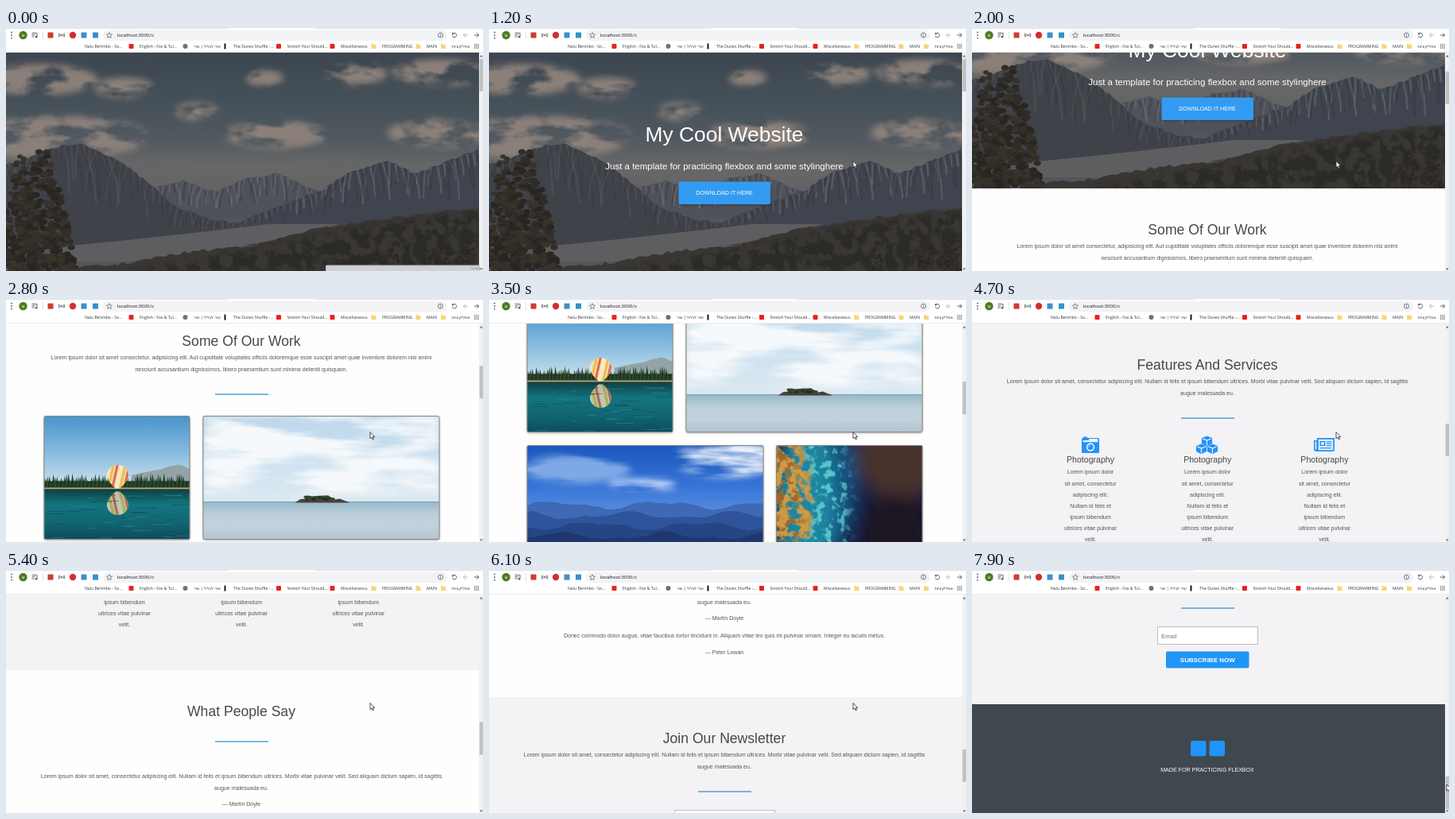
Animation, 600 px wide and 306 px high, one loop 8 s. Source, as an HTML page:

```html
<!DOCTYPE html>
<html lang="en">
<head>
<meta charset="utf-8">
<title>My Cool Website</title>
<style>
html, body { margin: 0; width: 100%; height: 100%; overflow: hidden; background: #fff; }
svg { display: block; }
text { font-family: "Liberation Sans", Arial, sans-serif; }
.ui { font-family: "Open Sans", "Noto Sans", "DejaVu Sans", sans-serif; }
.url { font-family: Roboto, sans-serif; }
</style>
</head>
<body>
<script>
let seed = 7;
const rand = () => (seed = (seed * 16807) % 2147483647) / 2147483647;
const jitter = a => (rand() - 0.5) * 2 * a;
const times = (n, f) => Array.from({ length: n }, (_, i) => f(i)).join('');

const rect = (x, y, w, h, fill, extra = '') =>
  `<rect x="${x}" y="${y}" width="${w}" height="${h}" fill="${fill}" ${extra}/>`;
const oval = (x, y, rx, ry, fill, extra = '') =>
  `<ellipse cx="${x}" cy="${y}" rx="${rx}" ry="${ry}" fill="${fill}" ${extra}/>`;
const disc = (x, y, r, fill) => oval(x, y, r, r, fill);
const path = (d, fill, extra = '') => `<path d="${d}" fill="${fill}" ${extra}/>`;
const line = (d, color, w = 1, extra = '') =>
  `<path d="${d}" fill="none" stroke="${color}" stroke-width="${w}" ${extra}/>`;
const using = (filter, content) => `<g filter="url(#${filter})">${content}</g>`;
// y is the optical middle of the line
const label = (x, y, s, size = 7.06, fill = '#555', extra = 'text-anchor="middle"') =>
  `<text x="${x}" y="${y + size * 0.35}" font-size="${size}" fill="${fill}" ${extra}>${s}</text>`;

// Evenly spaced vertical gradient
const gradient = (id, ...colors) =>
  `<linearGradient id="${id}" x2="0" y2="1">${colors.map((c, i) =>
    `<stop offset="${i / (colors.length - 1)}" stop-color="${c}"/>`).join('')}</linearGradient>`;
const REGION = 'x="-30%" y="-60%" width="160%" height="220%"';
const blur = (id, s) => `<filter id="${id}" ${REGION}><feGaussianBlur stdDeviation="${s}"/></filter>`;
// Softens a shape, then breaks it up with noise
const grain = (id, freq, soft, gain, shift) => `<filter id="${id}" ${REGION}>
  <feTurbulence type="fractalNoise" baseFrequency="${freq}" numOctaves="4" seed="3"/>
  <feColorMatrix values="0 0 0 0 1  0 0 0 0 1  0 0 0 0 1  ${gain} 0 0 0 ${-shift}" result="noise"/>
  <feGaussianBlur in="SourceGraphic" stdDeviation="${soft}"/>
  <feComposite operator="in" in2="noise"/></filter>`;

// Roughened ridge line through a few key points
function rough(points, amp, step = 6) {
  const out = [];
  points.slice(1).forEach(([x1, y1], i) => {
    const [x0, y0] = points[i];
    for (let x = x0; x < x1; x += step)
      out.push([x, y0 + (y1 - y0) * (x - x0) / (x1 - x0) + jitter(amp)]);
  });
  return [...out, points.at(-1)];
}
const area = (pts, base, fill) =>
  path(`M${pts[0][0]} ${base}L${pts.map(p => p.map(v => v.toFixed(1))).join('L')}L${pts.at(-1)[0]} ${base}Z`, fill);
const ridge = (points, base, fill, amp = 1.5) => area(rough(points, amp), base, fill);

// Ridge with light and dark gullies running down from its crest
function mountain(points, base, fill, light) {
  const crest = rough(points, 1.5, 4);
  return area(crest, base, fill) + crest.map(([x, y], i) => {
    const drop = (base - y) * (0.15 + rand() * 0.45);
    const lean = jitter(drop / 3);
    return line(`M${x} ${y + 1}l${lean * 0.6} ${drop * 0.5}l${lean * 0.2} ${drop * 0.5}`,
      i % 2 ? light : '#33363d', 1 + rand() * 2, 'opacity=".4"');
  }).join('');
}

// Conifer made of random tufts widening downwards
const pine = (x, top, h, w) => times(Math.round(h * 1.8), () => {
  const p = Math.sqrt(rand()), reach = w * Math.pow(p, 0.7);
  return oval(x + jitter(reach), top + h * p, 1 + w * 0.09, 1 + w * 0.06,
    ['#292622', '#302d27', '#37322a'][Math.floor(rand() * 3)]);
});

function hero() {
  const puffs = [[40, 65, 75], [148, 75, 38], [240, 105, 28], [325, 63, 24], [440, 58, 40],
    [545, 56, 60], [340, 134, 65], [550, 132, 70], [60, 138, 120]];
  return rect(0, 31, 595, 277, 'url(#dusk)') +
    using('puff', puffs.map(([x, y, r]) => oval(x, y, r, 6 + r * 0.18, '#8b8079')).join('')) +
    using('haze', oval(300, 178, 320, 18, '#77706d', 'opacity=".45"')) +
    mountain([[170, 205], [222, 192], [262, 206], [300, 190], [342, 183], [385, 203], [420, 212]], 245, '#4f525a', '#7a7a7d') +
    rect(0, 240, 595, 68, '#53555b') +
    mountain([[290, 245], [350, 221], [400, 203], [430, 182], [482, 167], [515, 184], [560, 166], [595, 152]], 256, '#3f444e', '#7c7c80') +
    mountain([[0, 172], [70, 148], [97, 147], [140, 165], [180, 196], [212, 224], [255, 240], [315, 250]], 274, '#40424a', '#5d5a59') +
    path('M60 276Q190 264 330 247L420 247L330 268L200 294H60Z', '#5e5e61') +
    ridge([[60, 304], [140, 298], [230, 282], [320, 272], [380, 255], [470, 241], [595, 226]], 308, '#393633', 2) +
    using('leaf', path('M150 308L320 276L470 246L595 230V308Z', '#2c2a28')) +
    pine(18, 153, 155, 28) + pine(47, 146, 162, 42) +
    pine(490, 284, 24, 9) + pine(550, 258, 50, 11) + pine(581, 268, 40, 14);
}

const heroText = () =>
  label(296, 134, 'My Cool Website', 26.4, '#fff') +
  label(296, 174, 'Just a template for practicing flexbox and some stylinghere', 11.53, '#fff') +
  using('glow', rect(238.5, 195, 115.5, 28.5, '#000', 'rx="2" opacity=".25"')) +
  rect(238.5, 193.5, 115.5, 28.5, '#339cf2', 'rx="2"') +
  label(296, 207.5, 'DOWNLOAD IT HERE', 7.1, '#fff');

function section(top, title, lines, ruleAt = 119) {
  return label(296, top + 52, title, 17.6, '#484848') +
    lines.map((s, i) => label(296, top + 73 + 14.2 * i, s)).join('') +
    rect(263, top + ruleAt - 0.6, 67, 1.3, '#3b93cb');
}

const card = (x, y, w, art) =>
  using('glow', rect(x, y + 1, w, 155, '#000', 'rx="2" opacity=".45"')) +
  `<svg x="${x}" y="${y}" width="${w}" height="155">${art}</svg>` +
  rect(x, y, w, 155, 'none', 'rx="2" stroke="#85887f"');

function balloon() {
  const shape = 'M79 75A13.5 13.5 0 1 1 106 75Q104 84 95 91H90Q81 84 79 75Z';
  const stripes = times(9, i =>
    line(`M${70 + i * 5} 94l8-36`, ['#e2684a', '#f6ead2', '#efbb4d'][i % 3], 3));
  const craft = path(shape, '#f3dfb0') + `<g clip-path="url(#envelope)">${stripes}</g>`;
  const trees = times(80, i => {
    const x = i * 2.4 - 3, h = 10 + rand() * 11;
    return path(`M${x} 92l2.6 ${-h}l2.6 ${h}Z`, i % 2 ? '#1c3526' : '#2d4a2c');
  });
  return `<clipPath id="envelope"><path d="${shape}"/></clipPath>` +
    rect(0, 0, 183, 92, 'url(#day)') +
    ridge([[110, 74], [145, 68], [168, 60], [183, 66]], 92, '#94a3a6', 1) +
    rect(0, 82, 183, 9, '#162c20') + trees +
    rect(0, 90, 183, 65, 'url(#lake)') + rect(0, 90, 183, 1.8, '#c3a76c') + craft +
    `<g transform="translate(0 186) scale(1 -1)" opacity=".75">${craft}</g>` +
    times(45, () => rect(rand() * 180 - 10, 96 + rand() * 58, 6 + rand() * 20, 0.8,
      rand() < 0.5 ? '#2a939c' : '#0c4350', 'opacity=".6"'));
}

const island = () =>
  rect(0, 0, 297, 109, 'url(#pale)') +
  using('wisp', rect(0, 0, 297, 98, '#f6f9fb')) +
  rect(0, 108, 297, 47, 'url(#sea)') + rect(0, 107.5, 297, 1, '#7f9fb0') +
  ridge([[116, 108], [123, 105], [134, 101], [157, 101], [166, 104], [183, 108]], 109, '#4a4038') +
  times(14, () => oval(144 + jitter(20), 103 + jitter(2), 3, 1.8, rand() < 0.5 ? '#39452f' : '#26301f'));

const blueHills = () =>
  rect(0, 0, 297, 155, 'url(#azure)') +
  using('wisp', oval(255, 18, 70, 22, '#f2f7fd') + oval(145, 50, 42, 7, '#dce9fa') + oval(60, 30, 70, 18, '#7fa9e6')) +
  ['#3f69b4', '#30549c', '#264585', '#1e376e', '#182b58'].map((fill, k) => {
    const crest = Array.from({ length: 34 }, (_, i) =>
      [i * 9, 75 + k * 13 - 4 * Math.sin(i * 0.42 + k * 2) - 2 * Math.sin(i * 0.9 + k) + jitter(0.8)]);
    return area(crest, 155, fill);
  }).join('');

const coast = () =>
  rect(0, 0, 184, 155, '#17183a') +
  using('haze', oval(155, 10, 55, 60, '#46302f') + oval(150, 120, 40, 60, '#1d1724') +
    oval(70, 50, 32, 80, '#18507e') + oval(36, 70, 38, 100, '#1b86a2')) +
  using('foam', oval(50, 70, 42, 100, '#58c3cb')) +
  using('leaf', oval(14, 78, 32, 95, '#d09a45')) +
  using('foam', oval(8, 78, 28, 95, '#9c662a'));

const BLUE = '#2094fa', PALE = '#f3f2f5';
const camera = rect(138, 976, 22, 19, BLUE, 'rx="1.5"') + rect(140, 974.5, 5, 2, BLUE) +
  rect(139.5, 979, 19, 2.2, PALE) + rect(147, 977, 11, 2, PALE) +
  disc(149, 987.5, 5.2, PALE) + disc(149, 987.5, 3.6, BLUE) +
  line('M146.8 987.5a2.2 2.2 0 0 1 2.2-2.2', PALE, 0.8);
const cube = (x, y) => path(`M${x} ${y}l6.6 2.6v7l-6.6 3.2l-6.6-3.2v-7Z`, BLUE) +
  line(`M${x - 5.4} ${y + 3.2}l5.4 2.3l5.4-2.3M${x} ${y + 5.5}v6.2`, PALE, 1.2);
const cubes = cube(295.5, 973.5) + cube(288.5, 983.5) + cube(302.5, 983.5);
const paper = path('M434 976h22v15q0 2-2 2h-21q-3 0-3-3v-11h4Z', BLUE) +
  rect(435.8, 977.8, 18.4, 13.4, PALE) + rect(431.6, 980.5, 1.7, 10, PALE) +
  rect(437.5, 980, 7, 6, BLUE) + rect(439, 981.5, 4, 3, PALE) +
  times(3, i => rect(446, 980 + i * 2.5, 6.5, 1.3, BLUE)) + rect(437.5, 988, 15, 1.3, BLUE);

const LOREM = ['Lorem ipsum dolor sit amet, consectetur adipiscing elit. Nullam id felis et ipsum bibendum ultrices. Morbi vitae pulvinar velit. Sed aliquam dictum sapien, id sagittis',
  'augue malesuada eu.'];
const BLURB = ['Lorem ipsum dolor', 'sit amet, consectetur', 'adipiscing elit.', 'Nullam id felis et',
  'ipsum bibendum', 'ultrices vitae pulvinar', 'velit.'];
const QUOTES = ['— Martin Doyle',
  'Donec commodo dolor augue, vitae faucibus tortor tincidunt in. Aliquam vitae leo quis mi pulvinar ornare. Integer eu iaculis metus.',
  '— Peter Lowan'];

const page = () =>
  hero() + `<g id="intro">${heroText()}</g>` +
  rect(0, 308, 595, 524, '#fefefe') +
  section(308, 'Some Of Our Work', [
    'Lorem ipsum dolor sit amet consectetur, adipisicing elit. Aut cupiditate voluptates officiis doloremque esse suscipit amet quae inventore dolorem nisi animi',
    'nesciunt accusantium dignissimos, libero praesentium sunt minima deleniti quisquam.']) +
  card(48, 454.5, 183, balloon()) + card(248, 454.5, 297, island()) +
  card(48, 626.5, 297, blueHills()) + card(361.5, 626.5, 183.5, coast()) +
  rect(0, 832, 595, 329, PALE) +
  section(832, 'Features And Services', LOREM) + camera + cubes + paper +
  times(3, i => label(149 + 147.2 * i, 1003, 'Photography', 10.6, '#484848') +
    BLURB.map((s, k) => label(149 + 147.2 * i, 1019 + 14.17 * k, s)).join('')) +
  rect(0, 1161, 595, 268, '#fefefe') +
  section(1161, 'What People Say', [], 90) +
  LOREM.map((s, i) => label(296, 1295 + 14.2 * i, s)).join('') +
  QUOTES.map((s, i) => label(296, 1330 + 21.2 * i, s)).join('') +
  rect(0, 1429, 595, 240, PALE) +
  section(1429, 'Join Our Newsletter', LOREM) +
  rect(233.5, 1571.5, 126, 22, '#fff', 'stroke="#bdbdbd"') +
  label(238, 1583, 'Email', 7.9, '#777', '') +
  rect(244, 1602.5, 104.5, 21, '#2095f5', 'rx="2"') +
  label(296.3, 1613, 'SUBSCRIBE NOW', 8, '#fff', 'text-anchor="middle" font-weight="bold"') +
  rect(0, 1669, 595, 140, '#40484f') +
  rect(275, 1715, 19.5, 19.5, BLUE, 'rx="3"') + rect(298.5, 1715, 19.5, 19.5, BLUE, 'rx="3"') +
  label(296, 1752, 'MADE FOR PRACTICING FLEXBOX', 7.08, '#fff');

const GREY = '#5a5e63';
const ICONS = {
  video: x => rect(x - 3, 20, 6, 6, '#e8231f', 'rx="1"'),
  folder: x => path(`M${x - 3} 20h2.5l1 1h2.5v5h-6Z`, '#f6d678'),
  round: x => disc(x, 23, 3, '#77706c'),
  bar: x => rect(x - 1, 19.5, 2, 7, '#161616'),
  grid: x => times(9, i => rect(x - 3 + (i % 3) * 2.2, 20 + Math.floor(i / 3) * 2.2, 1.5, 1.5,
    ['#d9685d', '#7fa968', '#6f8fc4'][i % 3]))
};
// Left edge, title and the icon that follows it
const BOOKMARKS = [[99, 'Nalu Berimbo - So...', 'video'], [168, 'English - Fox &amp; Tul...', 'round'],
  [236, 'שיר לגליל | שיר', 'bar'], [286, 'The Dunes Shuffle -...', 'video'],
  [353.5, 'Stretch Your Should...', 'video'], [421, 'Miscellaneous', 'folder'],
  [473, 'PROGRAMMING', 'folder'], [529, 'MAIN', 'folder'], [560.5, 'אפליקציות', 'grid']];

function toolbar() {
  const mark = (x, fill) => rect(x - 3.5, 5.5, 7, 7, fill, 'rx=".6"');
  return rect(0, 0, 600, 31, '#fff') + rect(0, 0, 279, 1, '#dfe2e7') + rect(388, 0, 212, 1, '#dfe2e7') +
    rect(122, 2.5, 433, 13.5, '#f1f3f4', 'rx="6.7"') +
    times(3, i => disc(7, 5.5 + 3.5 * i, 0.9, GREY)) +
    disc(21.5, 9, 5.2, '#4c7d1f') + label(21.5, 9, 'м', 5, '#fff', 'class="ui" text-anchor="middle"') +
    line('M32.5 6.3h6M32.5 8.6h4M32.5 10.9h3M39 6v5.4', GREY) + disc(37.9, 11.3, 1.3, GREY) +
    rect(45.8, 4, 0.8, 10, '#d5d8dc') +
    mark(56, '#cf3a30') + disc(70, 9, 1.1, GREY) +
    line('M68.2 7.2q-1.3 1.8 0 3.6M71.8 7.2q1.3 1.8 0 3.6M67 6.4q-1.9 2.6 0 5.2M73 6.4q1.9 2.6 0 5.2', GREY, 0.8) +
    disc(84, 9, 4.2, '#d12f2f') + mark(98, '#3f8fcb') + mark(112.5, '#3591c9') +
    line('M130 5.6l1 2.3l2.5.2l-1.9 1.7l.6 2.5l-2.2-1.3l-2.2 1.3l.6-2.5l-1.9-1.7l2.5-.2Z', GREY, 0.7) +
    label(139.7, 9, 'localhost:3000/c', 6.2, '#2d3034', 'class="url"') +
    line('M543.5 9a3 3 0 1 0 6 0a3 3 0 1 0-6 0M546.5 8.5v2.2M546.5 7v.8', GREY, 0.8) +
    line('M561.8 7.2a2.8 2.8 0 1 1-.6 2.6', GREY) + path('M561 5.4v2.8h2.8Z', GREY) +
    line('M581 9h-5.5M578 6.3l-2.7 2.7l2.7 2.7', '#b4b7ba') + line('M589 9h5.7M592 6.3l2.7 2.7l-2.7 2.7', GREY) +
    BOOKMARKS.map(([x, title, icon], i) => label(x, 23, title, 5.1, '#33363a', 'class="ui"') +
      ICONS[icon]((BOOKMARKS[i + 1]?.[0] ?? 602.5) - 10.5)).join('') +
    rect(0, 30.2, 600, 0.8, '#e6e6e6');
}

document.body.innerHTML = `<svg width="600" height="306" viewBox="0 0 600 306"><defs>
  ${gradient('dusk', '#3d464f', '#465159', '#5b6065', '#66645f', '#57585d')}
  ${gradient('day', '#4a93cb', '#86bce0', '#d3e4ec')}
  ${gradient('lake', '#0e3a3c', '#127580', '#116672', '#0e4c5f')}
  ${gradient('pale', '#bcd6eb', '#cfe2f0', '#dbe8f1')}
  ${gradient('sea', '#96b9c9', '#bccfda', '#c3d2dc', '#b2c5d1')}
  ${gradient('azure', '#1c57bd', '#3674d6', '#6a9ce6', '#4a78c0')}
  ${blur('haze', 10)}${blur('glow', 1.5)}
  ${grain('puff', '.018 .04', 4, 5, 1.9)}${grain('wisp', '.008 .04', 5, 4, 1.5)}
  ${grain('leaf', '.07', 3, 8, 3.4)}${grain('foam', '.1', 8, 7, 3.6)}</defs>
  <g id="page">${page()}</g>
  ${rect(595, 31, 5, 275, '#f1f1f1')}<rect id="thumb" x="595.6" width="4.4" height="41" fill="#c1c1c1"/>
  ${path('M596 36.5l1.8-2.5l1.8 2.5Z', '#666')}${path('M596 302.5l1.8 2.5l1.8-2.5Z', '#666')}
  <g id="status">${rect(402.5, 299, 193, 8, '#cfd1d3', 'stroke="#b4b6b9" rx="1"')}${label(598, 303, 'מחכה...', 4, '#777', 'class="ui" text-anchor="end"')}</g>
  ${toolbar()}
  <path id="cursor" d="M0 0v8.2l1.9-1.7l1.3 2.9l1.4-.6l-1.3-2.8h2.5Z" fill="#fff" stroke="#222" stroke-width=".8"/>
</svg>`;

const [view, intro, thumb, status, cursor] =
  ['page', 'intro', 'thumb', 'status', 'cursor'].map(id => document.getElementById(id));

const progress = (t, from, to) => Math.min(1, Math.max(0, (t - from) / (to - from)));
const mix = (a, b, p) => a + (b - a) * p;
// Wheel scrolling, then a drag of the scrollbar: [time, offset]
const SCROLL = [[1400, 0], [2000, 106], [2800, 307], [3500, 442], [4700, 801], [6100, 1269],
  [6300, 1300], [6600, 1300], [7300, 1500]];
const scrollAt = t => SCROLL.slice(1).reduce((y, [t1, y1], i) =>
  y + (y1 - SCROLL[i][1]) * progress(t, SCROLL[i][0], t1), 0);

function draw(t) {
  const y = scrollAt(t), thumbY = 39 + y * 221 / 1500;
  const reach = progress(t, 6200, 6600);
  view.setAttribute('transform', `translate(0 ${-y})`);
  thumb.setAttribute('y', thumbY);
  intro.setAttribute('opacity', progress(t, 100, 1000));
  status.setAttribute('visibility', t < 300 ? 'visible' : 'hidden');
  cursor.setAttribute('visibility', t < 600 ? 'hidden' : 'visible');
  cursor.setAttribute('transform',
    `translate(${mix(458, 597, reach)} ${mix(167.5, thumbY + 10, reach)})`);
}

const start = performance.now();
let shown = -1;
function loop() {
  const t = Math.floor(((performance.now() - start) % 8000) / 100) * 100;
  if (t !== shown) draw(shown = t);
  requestAnimationFrame(loop);
}
loop();
</script>
</body>
</html>
```
